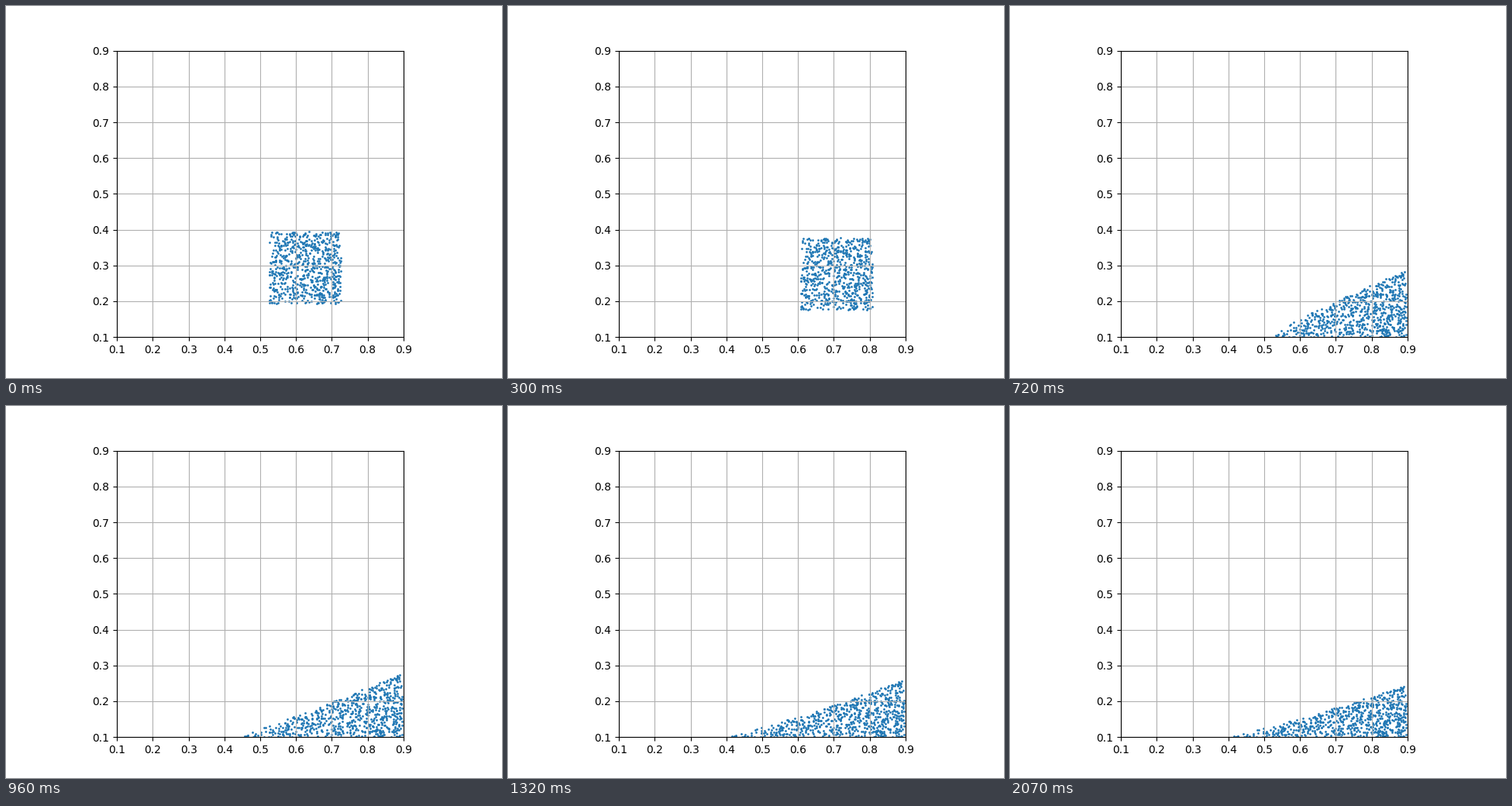
Write a matplotlib script that moves like this. It is 640 px wide and 480 px high and loops after 2100 ms.

```python
import numpy as np
import matplotlib.pyplot as plt
from matplotlib.animation import FuncAnimation

FRAMES, STEP = 70, 30
COUNT = 700
FLOOR, WALL = 0.1, 0.897

# Thrown block: lower-left corner, side, velocity and half gravity per frame
X0, Y0, SIDE = 0.525, 0.194, 0.2
VX, VY, HALF_G = 0.00827, 0.00564, 0.000737
LAND = (VY + np.sqrt(VY**2 + 4 * HALF_G * (Y0 - FLOOR))) / (2 * HALF_G)

# Pile: final left edge, frames until it stops spreading, top heights
TOE, SPREAD = 0.383, 28
HIGH, LOW = 0.188, 0.146

rng = np.random.default_rng(4)
u, v = rng.random((2, COUNT))


def smooth(a, b, n):
    p = np.clip((n - a) / (b - a), 0, 1)
    return p * p * (3 - 2 * p)


def flight(n):
    x = X0 + VX * n + SIDE * u
    y = Y0 + VY * n - HALF_G * n**2 + SIDE * v
    return x, y


def pile(n):
    """Even-density heap whose outline h * s**q turns from flat to a slope."""
    ease = 1 - (1 - min((n - LAND) / SPREAD, 1)) ** 2
    start = X0 + VX * LAND
    left = start + (TOE - start) * ease
    right = min(WALL, start + SIDE + 2 * VX * (n - LAND))
    q = 1.2 * np.sqrt(ease)
    h = HIGH + (LOW - HIGH) * smooth(20, 60, n)
    s = u ** (1 / (1 + q))
    return left + (right - left) * s, FLOOR + h * v * s**q


def grains(n):
    return np.column_stack(flight(n) if n < LAND else pile(n))


fig, ax = plt.subplots(figsize=(6.4, 4.8), dpi=100)
ticks = np.arange(1, 10) / 10
ax.set(xlim=(0.1, 0.9), ylim=(0.1, 0.9), xticks=ticks, yticks=ticks)
ax.set_aspect("equal")
ax.grid(True)
dots = ax.scatter(*grains(0).T, s=1, color="tab:blue")


def update(n):
    dots.set_offsets(grains(n))
    return (dots,)


anim = FuncAnimation(fig, update, frames=FRAMES, interval=STEP,
                     repeat=True, repeat_delay=0)
plt.show()
```
